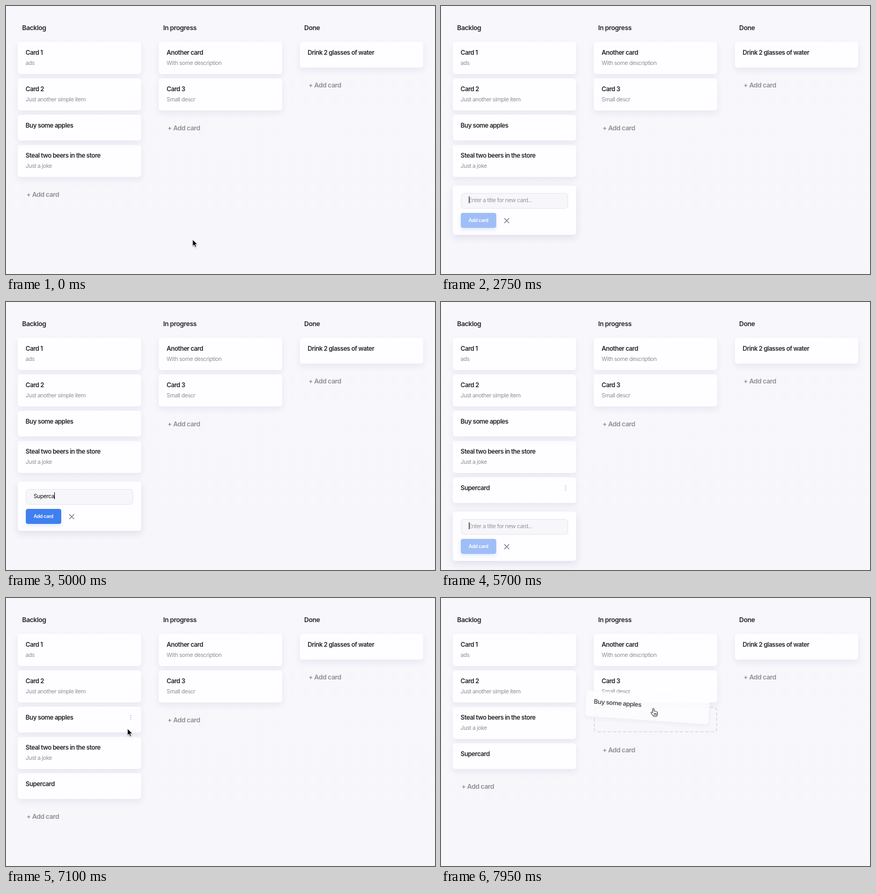
Animation of 800x500 px, one loop 8 s. Source, as an HTML page:

```html
<!DOCTYPE html>
<html lang="en">
<head>
<meta charset="utf-8">
<title>Task board</title>
<style>
  html, body { margin: 0; width: 100%; height: 100%; overflow: hidden; background: #f8f7fb; }
  #stage {
    position: relative; width: 800px; height: 500px; overflow: hidden;
    background: linear-gradient(#f8f7fb, #f7f6fa);
    font-family: Inter, "Open Sans", sans-serif; color: #252529;
  }
  #stage div, #stage svg { position: absolute; box-sizing: border-box; white-space: nowrap; }
  .head, .add { font-size: 12.2px; font-weight: 600; line-height: 20px; }
  .head { top: 30.5px; letter-spacing: -.36px; }
  .add { color: #8f8e95; letter-spacing: -.41px; }
  .card, .form {
    width: 230px; border-radius: 5px; background: #fefdff;
    box-shadow: 0 5px 12px rgba(84, 62, 150, .085);
  }
  .card { height: 47.5px; }
  .card.tall { height: 59.5px; }
  .card div { left: 14.6px; line-height: 20px; }
  .card .title { top: 9.5px; font-size: 11.65px; font-weight: 600; letter-spacing: -.48px; }
  .card .desc { top: 29.5px; font-size: 10.5px; letter-spacing: -.42px; color: #8f8e95; }
  .card svg { left: 208px; top: 14px; fill: #b5b4bb; }
  .drag { opacity: .8; z-index: 2; transform: rotate(4deg); box-shadow: 0 3px 9px rgba(84, 62, 150, .07); }
  .form { left: 22px; height: 92px; box-shadow: 0 5px 14px rgba(84, 62, 150, .13); }
  .input {
    left: 15px; top: 13.5px; width: 200px; height: 29px; padding-left: 13.5px;
    border: 1.5px solid #e6e5ec; border-radius: 6px; background: #f7f6fa;
    font-size: 10.6px; letter-spacing: -.45px; line-height: 26px; color: #141416;
  }
  .hint { color: #98979e; }
  .caret {
    display: inline-block; position: relative; top: -1px; width: 1px; height: 13px;
    margin-right: -1px; background: #000; vertical-align: middle;
  }
  .button {
    left: 15px; top: 51px; width: 65.5px; height: 27.5px; border-radius: 4px;
    font-size: 9px; font-weight: 600; letter-spacing: -.36px; line-height: 27px;
    text-align: center; color: #fff; box-shadow: 0 3px 7px rgba(63, 127, 239, .16);
  }
  .close { left: 95px; top: 60px; }
  #cursor { left: 0; top: 0; z-index: 3; overflow: visible; filter: drop-shadow(0 1px 1px rgba(0, 0, 0, .3)); }
</style>
</head>
<body>
<div id="stage"></div>
<script>
const LOOP = 8000, STEP = 50;
const COL_X = [22, 285, 548];
const OPEN = 2750, SUBMIT = 5700, CLOSE = 6750, GRAB = 7550, CROSS = 7750;
const stage = document.getElementById('stage');

function make(cls, html = '', parent = stage) {
  const el = document.createElement('div');
  el.className = cls;
  el.innerHTML = html;
  parent.append(el);
  return el;
}
function place(el, x, y) {
  el.style.left = x + 'px';
  el.style.top = y + 'px';
}
function show(el, on) { el.style.display = on ? '' : 'none'; }

const DOTS = '<svg width="5" height="12"><circle cx="2.5" cy="2" r="1"/>' +
  '<circle cx="2.5" cy="6" r="1"/><circle cx="2.5" cy="10" r="1"/></svg>';

function card(title, desc) {
  const el = make(desc ? 'card tall' : 'card',
    `<div class="title">${title}</div>` + (desc ? `<div class="desc">${desc}</div>` : '') + DOTS);
  return { el, dots: el.querySelector('svg'), h: desc ? 59.5 : 47.5 };
}

['Backlog', 'In progress', 'Done'].forEach((name, i) => {
  make('head', name).style.left = COL_X[i] + 8 + 'px';
});
const adds = COL_X.map(() => make('add', '+ Add card'));

const steal = card('Steal two beers in the store', 'Just a joke');
const first = [card('Card 1', 'ads'), card('Card 2', 'Just another simple item')];
const second = [card('Another card', 'With some description'), card('Card 3', 'Small descr')];
const third = [card('Drink 2 glasses of water')];
const supercard = card('Supercard');
const slot = {
  el: make('', '<svg width="230" height="48"><rect x="1" y="1" width="228" height="45.5" rx="5" ' +
    'fill="none" stroke="#d8d7de" stroke-width="1.6" stroke-dasharray="6 3.6"/></svg>'),
  h: 47.5
};
const apples = card('Buy some apples');

const form = make('form',
  '<div class="input"><span class="typed"></span><span class="caret"></span>' +
  '<span class="hint">Enter a title for new card...</span></div>' +
  '<div class="button">Add card</div>' +
  '<svg class="close" width="11" height="11"><path d="M1 1L10 10M10 1L1 10" stroke="#82818a" stroke-width="1.5"/></svg>');
const [typed, caret, hint, button] =
  ['.typed', '.caret', '.hint', '.button'].map(s => form.querySelector(s));

stage.insertAdjacentHTML('beforeend',
  `<svg id="cursor" width="16" height="18" stroke-linejoin="round" stroke-linecap="round">
    <path id="arrow" d="M0 0V12.2L2.8 9.6L4.7 14L6.9 13L5 8.8H8.8Z" fill="#000" stroke="#fff" stroke-width=".9"/>
    <path id="hand" d="M-1.2 7.6V1.2Q-1.2 0 0 0T1.2 1.2V5Q3 4.2 3.6 5.6Q5.2 4.8 5.8 6.3Q7.6 5.8 7.6 7.6V10Q7 11.5 6.5 14H.3Q-1.4 11.8-4.2 8.6Q-4.8 7-3.4 7Q-2.4 7-1.2 8.2M1.6 9V11.5M3.5 9V11.5M5.3 9V11.5" fill="#fff" stroke="#111" stroke-width=".9"/>
  </svg>`);
const cursor = document.getElementById('cursor');
const arrow = document.getElementById('arrow');
const hand = document.getElementById('hand');

// Pointer path: time, x, y
const POINTER = [
  [0, 348, 436], [50, 338, 431], [200, 205, 387], [350, 92, 348], [400, 83, 345],
  [950, 83, 345], [1000, 80, 356], [1150, 42, 415], [1250, 42, 415], [1350, 88, 400],
  [1900, 88, 380], [1950, 86, 379], [2200, 72, 349],
  [6050, 72, 352], [6100, 84, 353], [6300, 225, 349], [6550, 356, 343],
  [6750, 355, 342], [6850, 335, 325], [7150, 205, 228], [7300, 188, 218],
  [7500, 188, 218], [7550, 197, 217], [7650, 262, 211], [7950, 396, 206]
];
// Centre of the dragged card
const DRAG = [[7550, 146, 226], [7650, 210.5, 220], [7800, 300, 211], [7950, 385.3, 203.3]];
const KINDS = [
  [0, 'arrow'], [350, 'hand'], [1000, 'arrow'], [1400, ''], [1950, 'arrow'],
  [2100, 'hand'], [OPEN, ''], [6100, 'arrow'], [7800, 'hand']
];
const WORD = 'Supercard';
const KEYS = [3700, 3900, 4150, 4800, 4850, 4950, 5000, 5150, 5300];

function along(path, t) {
  const i = path.findIndex(p => p[0] > t);
  if (i < 0) return path[path.length - 1].slice(1);
  if (i === 0) return path[0].slice(1);
  const a = path[i - 1], b = path[i], k = (t - a[0]) / (b[0] - a[0]);
  return [a[1] + (b[1] - a[1]) * k, a[2] + (b[2] - a[2]) * k];
}

function mix(a, b, k) {
  return `rgb(${a.map((v, i) => Math.round(v + (b[i] - v) * k))})`;
}

function drawForm(t, y) {
  place(form, 22, y);
  const text = t < SUBMIT ? WORD.slice(0, KEYS.filter(k => k <= t).length) : '';
  typed.textContent = text;
  show(hint, !text);
  const off = (t >= 3250 && t < 3700) || t >= 6200;
  caret.style.visibility = off ? 'hidden' : 'visible';
  const k = text ? Math.min(1, (t - KEYS[0] + STEP) / 200) : 0;
  button.style.background = mix([159, 190, 247], [63, 127, 239], k);
}

function draw(t) {
  const dragging = t >= GRAB, crossed = t >= CROSS, open = t >= OPEN && t < CLOSE;
  const lists = [
    [...first, ...(crossed ? [] : [dragging ? slot : apples]), steal, ...(t >= SUBMIT ? [supercard] : [])],
    [...second, ...(crossed ? [slot] : [])],
    third
  ];
  const [mx, my] = along(POINTER, t);
  show(slot.el, dragging);
  show(supercard.el, t >= SUBMIT);
  show(form, open);
  show(adds[0], !open);

  lists.forEach((list, c) => {
    let y = 67;
    for (const item of list) {
      place(item.el, COL_X[c], y);
      if (item.dots) {
        const over = mx >= COL_X[c] && mx < COL_X[c] + 230 && my >= y && my < y + item.h;
        show(item.dots, over && !dragging);
      }
      y += item.h + 8.5;
    }
    place(adds[c], COL_X[c] + 16.3, y + 15);
    if (c === 0 && open) drawForm(t, y + 8);
  });

  apples.el.classList.toggle('drag', dragging);
  if (dragging) {
    const [x, y] = along(DRAG, t);
    place(apples.el, x - 115, y - 23.75);
    show(apples.dots, false);
  }

  const kind = KINDS.filter(k => k[0] <= t).pop()[1];
  show(arrow, kind === 'arrow');
  show(hand, kind === 'hand');
  cursor.style.transform = `translate(${mx}px, ${my}px)`;
}

const start = performance.now();
function tick() {
  const t = (performance.now() - start) % LOOP;
  draw(Math.floor(t / STEP) * STEP);
  requestAnimationFrame(tick);
}
tick();
</script>
</body>
</html>
```
